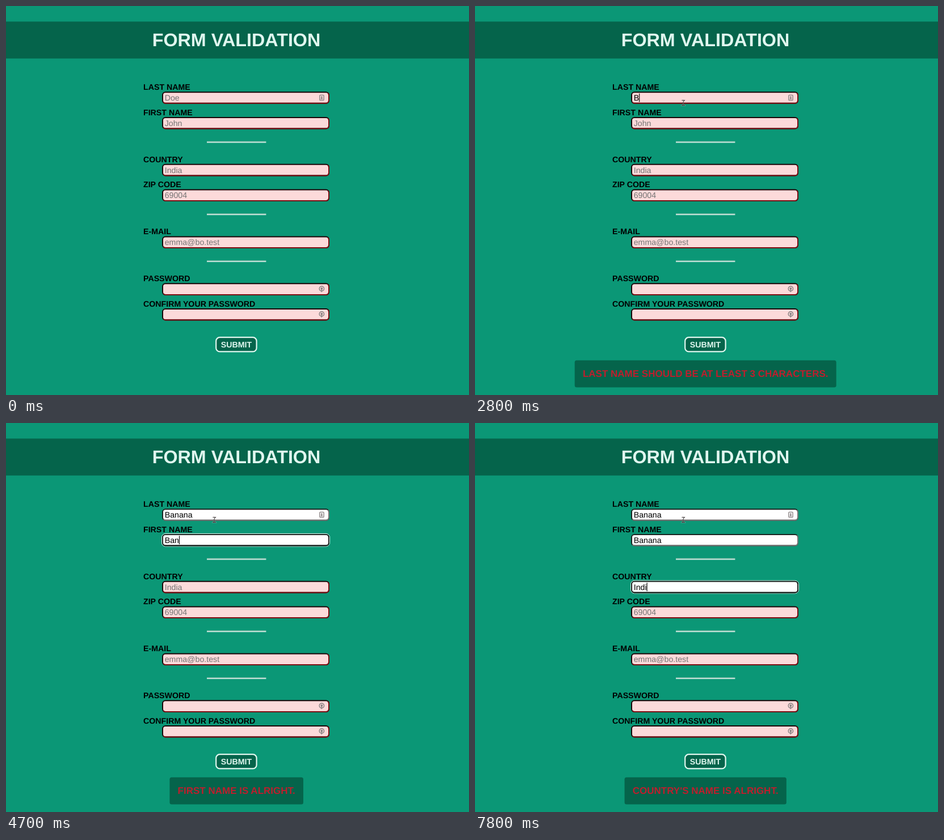
Write an HTML page that moves like this. It is 816x687 px and loops after 8000 ms.

```html
<!DOCTYPE html>
<html lang="en">
<head>
<meta charset="utf-8">
<title>Form validation</title>
<style>
  html, body { margin: 0; width: 100%; height: 100%; overflow: hidden; background: #0b9776; }
  svg { display: block; font: 14.2px "Liberation Sans", Arial, sans-serif; text-rendering: geometricPrecision; }
  .label, .bold { font-weight: bold; }
  .middle { text-anchor: middle; }
  .box { fill: #fcdada; stroke: #1a0507; stroke-width: 2; }
  .lower { fill: none; stroke: #7b0d12; stroke-width: 2; }
  .valid .box { fill: #fff; stroke: #1b2421; }
  .valid .lower { stroke: #767676; }
  .focus.valid .lower { stroke: #1b2421; }
  .ring { fill: none; stroke: #e8f5f0; visibility: hidden; }
  .focus.valid .ring { visibility: visible; }
  .hint { fill: #757575; }
  .filled { fill: #000; }
  .icon { fill: none; stroke: #8b8384; stroke-width: 1.4; }
  .icon .solid { fill: #8b8384; stroke: none; }
</style>
</head>
<body>
<svg width="816" height="687" viewBox="0 0 816 687">
  <rect y="27.5" width="816" height="65.2" fill="#05644b"/>
  <text class="bold middle" x="406" y="71" font-size="32.3" fill="#e0f7ef">FORM VALIDATION</text>
  <g id="form"></g>
  <rect x="370.2" y="585.2" width="71.4" height="25.2" rx="6.5" fill="#05644b" stroke="#e0f7ef" stroke-width="2.2"/>
  <text class="bold middle" x="406" y="602.7" fill="#e0f7ef">SUBMIT</text>
  <g id="message">
    <rect y="625.7" height="47.8" rx="3.5" fill="#05644b"/>
    <text class="bold middle" x="406.2" y="655" font-size="17" fill="#be1e2d"></text>
  </g>
  <path id="arrow" d="M0 0V13L3 10.3L5 15L7 14L5 9.6H9Z" fill="#111" stroke="#fff" stroke-width=".8"/>
  <g id="beam" fill="none">
    <path d="M-2.5 -4.5H2.5L0 -2V2L2.5 4.5H-2.5L0 2" stroke="#cdbcbc" stroke-width="1.8" opacity=".5"/>
    <path d="M-2.5 -4.5H2.5L0 -2V2L2.5 4.5H-2.5L0 2" stroke="#3c3c3c"/>
  </g>
</svg>
<script>
const LOOP = 8000, STEP = 100;
const $ = selector => document.querySelector(selector);

// keys: the time of each key press
const fields = [
  { y: 162, label: 'LAST NAME', hint: 'Doe', icon: 'card', word: 'Banana',
    focus: [1300, 3800], keys: [2800, 3100, 3100, 3300, 3400, 3500] },
  { y: 206.7, label: 'FIRST NAME', hint: 'John', word: 'Banana',
    focus: [3800, 6300], keys: [4200, 4500, 4700, 4800, 5000, 5100] },
  { y: 289.6, label: 'COUNTRY', subject: "COUNTRY'S NAME", hint: 'India', word: 'Indi',
    focus: [6300, LOOP], keys: [7200, 7400, 7700, 7800] },
  { y: 334.3, label: 'ZIP CODE', hint: '69004' },
  { y: 417.2, label: 'E-MAIL', hint: 'emma@bo.test' },
  { y: 500.1, label: 'PASSWORD', hint: '', icon: 'lock' },
  { y: 544.8, label: 'CONFIRM YOUR PASSWORD', hint: '', icon: 'lock' }
];
const caretOff = [[1900, 2600], [5700, 6300], [6800, 7200]];

const icons = {
  card: `<rect x="-3.5" y="-4.6" width="7.2" height="9.2" rx="1"/>
    <circle class="solid" cy="-1.6" r="1.2"/><path class="solid" d="M-1 -1H1V2H2V3H-2V2H-1Z"/>`,
  lock: `<circle cy="-.9" r="4.2"/><circle class="solid" cy="-1" r="2"/>
    <path class="solid" d="M-.8 0H.8V4L0 5.4L-1.6 4.2L-.8 3.6Z"/>`
};

const fieldMarkup = ({ y, label, hint, icon }) => `
  <text class="label" x="242" y="${y - 14}">${label}</text>
  <g class="field" transform="translate(0 ${y})">
    <rect class="ring" x="274.5" y="-11.3" width="296" height="22.6" rx="6.5"/>
    <rect class="box" x="276" y="-9.8" width="293" height="19.6" rx="5"/>
    <path class="lower" d="M277.5 8.3A5 5 0 0 0 281 9.8H564a5 5 0 0 0 5 -5V-4.8a5 5 0 0 0 -1.5 -3.5"/>
    <text class="value" x="279.7" y="5">${hint}</text>
    ${icon ? `<g class="icon" transform="translate(556.4 0)">${icons[icon]}</g>` : ''}
    <rect class="caret" y="-7.5" width="1.1" height="15"/>
  </g>`;

const ruleMarkup = y => `
  <rect x="354" y="${y - 1.4}" width="104.4" height="1.5" fill="#8fbfae"/>
  <rect x="354" y="${y}" width="104.4" height="1.4" fill="#e4f3ee"/>`;

$('#form').innerHTML = fields.map(fieldMarkup).join('') + [240.2, 367.8, 450.7].map(ruleMarkup).join('');
document.querySelectorAll('.field').forEach((node, i) => {
  fields[i].node = node;
  fields[i].value = node.querySelector('.value');
  fields[i].caret = node.querySelector('.caret');
});

const within = (t, [from, to]) => t >= from && t < to;
const show = (node, visible) => node.setAttribute('visibility', visible ? 'visible' : 'hidden');

function drawField(field, t) {
  const { node, value, caret, word, hint, keys = [], focus = [0, 0] } = field;
  const count = field.count = keys.filter(time => time <= t).length;
  const focused = within(t, focus);
  value.textContent = count ? word.slice(0, count) : hint;
  value.setAttribute('class', 'value ' + (count ? 'filled' : 'hint'));
  node.classList.toggle('valid', count >= 3);
  node.classList.toggle('focus', focused);
  show(caret, focused && !caretOff.some(span => within(t, span)));
  caret.setAttribute('x', 279.7 + (count ? value.getComputedTextLength() : 0));
}

function drawMessage(t) {
  const current = fields.filter(field => field.count).pop();
  let text = 'PLEASE, ENTER YOUR LAST NAME.';
  if (current) {
    const ending = current.count < 3 ? 'SHOULD BE AT LEAST 3 CHARACTERS.' : 'IS ALRIGHT.';
    text = `${current.subject || current.label} ${ending}`;
  }
  const [box, line] = $('#message').children;
  line.textContent = text;
  const width = line.getComputedTextLength() + 28.4;
  box.setAttribute('x', 406.2 - width / 2);
  box.setAttribute('width', width);
  show($('#message'), t >= 1500);
}

function drawPointer(t) {
  const progress = Math.min(1, Math.max(0, (t - 600) / 300));
  const eased = 1 - (1 - progress) ** 2;
  const place = `translate(${326 + 41 * eased} ${98 + 73 * eased})`;
  for (const id of ['#arrow', '#beam']) $(id).setAttribute('transform', place);
  show($('#arrow'), within(t, [600, 800]));
  show($('#beam'), t >= 800);
}

function draw(now) {
  const t = Math.floor(now % LOOP / STEP) * STEP;
  fields.forEach(field => drawField(field, t));
  drawMessage(t);
  drawPointer(t);
  requestAnimationFrame(draw);
}
draw(0);
</script>
</body>
</html>
```
